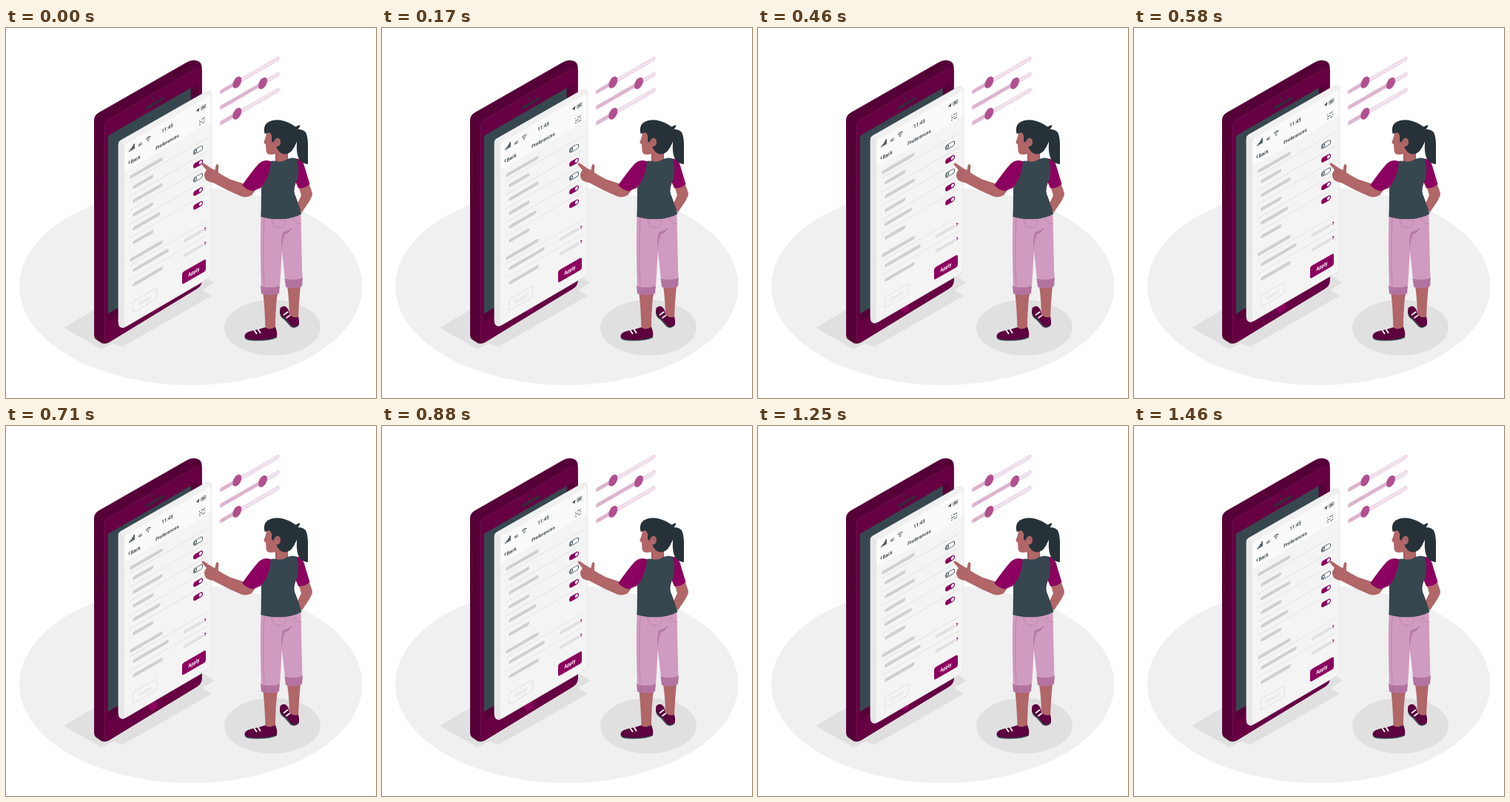
Write an HTML page that moves like this. It is 500 px wide and 500 px high and loops after 1500 ms.

```html
<!DOCTYPE html>
<html lang="en">
<head>
<meta charset="utf-8">
<title>Preferences</title>
<style>
  html, body { margin: 0; width: 100%; height: 100%; overflow: hidden; background: #fff; }
  svg { display: block; width: 100vw; height: 100vh; }
  text { font-family: Roboto, "Liberation Sans", sans-serif; font-weight: 500; text-anchor: middle; fill: #263238; }
  .panel { animation: float 1.5s linear infinite; }
  @keyframes float {
    0%, 100% { transform: translateY(0); }
    50% { transform: translateY(-10px); }
  }
  .accent { fill: #8c005f; }
  .skin { fill: #b16668; }
  .shade { fill: #9a5558; }
  .hair { fill: #263238; }
  .slate { fill: #37474f; }
  .pants { fill: #d09bc0; }
  .cuff { fill: #b273a0; }
  .shoe { fill: #5c003e; }
  .side { fill: #560038; }
  .bars { stroke: #cfcfcf; stroke-width: 4.6; stroke-linecap: round; }
  .soft { stroke: #e0e0e0; stroke-width: 4.6; stroke-linecap: round; }
  .rules { stroke: #dedede; stroke-width: .8; }
  .ink { fill: none; stroke: #263238; stroke-width: .8; }
  .bold { stroke-width: 1.5; }
  .fold { fill: none; stroke: #b57ba5; stroke-width: .8; }
  .crease { fill: none; stroke: #9a5558; stroke-width: .8; }
</style>
</head>
<body>
<svg viewBox="0 0 500 500" xmlns="http://www.w3.org/2000/svg">
  <defs>
    <g id="on">
      <rect class="accent" x="-6.5" y="-3.5" width="13" height="7" rx="3.1" ry="3.5"/>
      <ellipse cx="3.3" rx="2" ry="2.2" fill="#fff"/>
    </g>
    <g id="off">
      <rect x="-6.1" y="-3.1" width="12.2" height="6.200" rx="2.8" ry="3.1" fill="#fff" stroke="#37474f" stroke-width=".8"/>
      <ellipse cx="-3.3" rx="1.5" ry="1.7" fill="#fff" stroke="#37474f"/>
    </g>
    <path id="chevron" d="M-1 -2 1 0 -1 2" fill="none" stroke="#8c005f" stroke-width=".9"/>
    <rect id="track" y="-2.5" width="80" height="5" rx="1.5" fill="#f3e2ee" stroke="#d9b3cc" stroke-width=".5"/>
    <ellipse id="knob" rx="6" ry="7.2" fill="#b0508f"/>
  </defs>

  <!-- floor and shadows -->
  <ellipse cx="249.7" cy="349" rx="231.7" ry="133.5" fill="#f0f0f0"/>
  <ellipse cx="360" cy="405" rx="65" ry="37.6" fill="#e0e0e0"/>
  <path d="M78 405 119 381 264 333 282 344 265 354 278 362 157 431 145 426 129 434Z" fill="#e0e0e0"/>

  <!-- phone -->
  <path class="side" d="M119 125Q119 118 125 114.500L244 46.500Q253 41 261 45.500 264.700 48 264.700 54V341Q264.700 348 258 352L139 425Q132 428 128 425L122 421Q119 419 119 414Z"/>
  <path d="M133 133Q133 127 138 124L258 54.500Q264.700 51 264.700 58V341Q264.700 348.500 258 352.500L140 424Q133 428 133 420Z" fill="#660043"/>
  <path d="M133.200 420V133Q133.200 127 138 124L258 54.500" fill="none" stroke="#7a1f5a" stroke-width=".6"/>
  <path d="M124 164 127 166V202L124 200ZM124 206 127 208V230L124 228ZM226 60 243 50 246 51.500 229 61.500Z" fill="#4a0031"/>
  <path class="side" d="M138 145.500 260 75V326L138 397Z"/>
  <path class="slate" d="M138 145.500 249.700 81V321L138 386Z"/>
  <path d="M190.500 108 212.500 95.500" stroke="#37263a" stroke-width="4" stroke-linecap="round"/>
  <circle cx="198" cy="94.500" r="1.500" fill="#37263a"/>
  <ellipse cx="198.500" cy="377.500" rx="6" ry="7" transform="rotate(25 198.500 377.500)" class="accent"/>

  <!-- floating settings panel -->
  <g class="panel">
    <path d="M151.800 158Q151.800 153.500 155 151.500L268 87Q275 83 277.500 88L278 95V331Q278 335.500 274 338L162 403.500Q158 406 155 404.500L153 403Q151.800 401 151.800 397Z" fill="#f0f0f0"/>
    <path d="M151.800 158Q151.800 154.500 153 153L160.500 158V404.500Q157 406 154.500 404 151.800 402 151.800 397Z" fill="#e8e8e8"/>
    <path d="M160 163Q160 158.500 164 156L273 93Q278 90 278 95V331Q278 335.500 274 338L164 402Q160 404.500 160 399Z" fill="#f4f4f4"/>
    <path d="M160 163Q160 158.500 164 156L273 93Q278 90 278 95V126L160 194Z" fill="#fafafa"/>
    <path d="M268 87Q275 83 277.500 88V331Q277.500 335.500 274 338L162 403.500" fill="none" stroke="#dedede" stroke-width=".7"/>

    <g transform="translate(160) skewY(-30)">
      <path class="ink bold" d="M7 171v-1.500M9 171v-3M11 171v-5M13 171v-7"/>
      <path class="ink" d="M29 167.500q3.300-3.200 6.600 0M30.500 169.200q1.800-1.800 3.600 0"/>
      <circle class="hair" cx="32.300" cy="170.900" r=".8"/>
      <path class="hair" d="M96.500 168.500 101.500 166 100 171.500 99 169Z"/>
      <rect class="ink" x="103.800" y="166.300" width="6" height="4.600" rx=".8" stroke-opacity=".7"/>
      <rect class="hair" x="104.900" y="167.500" width="3.600" height="2.200" opacity=".8"/>
      <path class="ink" d="M101 183.500h1.200M104 183.500h5M101 186.500h4.500M107.500 186.500h1.500M101 189.500h2M105 189.500h4"/>
      <path class="ink" d="M7.200 183.300 5.800 185.300 7.200 187.300"/>
      <g transform="scale(.866 1)">
        <text x="24.500" y="171.500" font-size="5.200">4G</text>
        <text x="67" y="171.300" font-size="7">11:45</text>
        <text x="67" y="189.600" font-size="6.700">Preferences</text>
        <text x="17.300" y="188.300" font-size="6.800">Back</text>
      </g>

      <path class="rules" d="M7 213H112M7 231.800H112M7 250.500H112M7 269.300H112M7 288H112M7 325.500H112M7 344.500H112"/>
      <path class="bars" d="M9.500 206.300H49.500M13.500 222.400H37M13.500 241.100H49.500M13.500 259.800H37M13.500 278.400H46M13.500 297.100H37M9.500 318.500H49.500M13.500 334.500H57.500M13.500 354H49.500"/>
      <path class="soft" d="M82 334.700H104M82 354.300H104"/>
      <use href="#off" x="99.500" y="222.400"/>
      <use href="#on" x="99.500" y="241.100"/>
      <use href="#off" x="99.500" y="259.800"/>
      <use href="#on" x="99.500" y="278.400"/>
      <use href="#on" x="99.500" y="297.100"/>
      <use href="#chevron" x="109" y="334.300"/>
      <use href="#chevron" x="109" y="353.700"/>

      <rect class="accent" x="78" y="375.400" width="32" height="16.400" rx="2.600"/>
      <rect x="11.400" y="376.200" width="32" height="15" rx="2.400" fill="none" stroke="#dedede" stroke-width=".9"/>
      <g transform="scale(.866 1)">
        <text x="108.500" y="386.200" font-size="7" style="fill:#fff;font-weight:700">Apply</text>
        <text x="31.700" y="386.100" font-size="6.800" style="fill:#dcdcdc">Cancel</text>
      </g>
    </g>
  </g>

  <!-- sliders -->
  <g transform="translate(289 87) skewY(-30)">
    <use href="#track"/>
    <use href="#track" y="21.200"/>
    <use href="#track" y="42.200"/>
    <path d="M1 0H23M1 21.200H58M1 42.200H23" stroke="#ddb3cf" stroke-width="4.600"/>
    <use href="#knob" x="23.300"/>
    <use href="#knob" x="58" y="21.200"/>
    <use href="#knob" x="23.300" y="42.200"/>
  </g>

  <!-- legs -->
  <path class="skin" d="M380 349H398Q396 366 395 393L383 393Q383 368 380 349ZM347.500 359H367Q364 376 364 409L350.500 409Q350 382 347.500 359Z"/>
  <path class="slate" d="M370 383Q369 390 376 394L385 404Q391 407 395.500 402V398Z"/>
  <path class="shoe" d="M370 382Q370 375 377 376 382 378 383 387 389 393 395 390 397 397 395.500 401 392 405 386 402.500L378 393Q370 389 370 382Z"/>
  <path d="M375 388 381 383.500M378.500 392 384 388" stroke="#fff" stroke-width="1.700"/>
  <path class="slate" d="M322.500 416Q322 422.500 332 422.500 354 424 366 418.500V414Z"/>
  <path class="shoe" d="M322.500 416.500Q322.500 411.500 331 409.500 342 407.500 350 404.500 356 409 364 404 367 411 366 417 352 422.500 334 421 322.500 420.500 322.500 416.500Z"/>
  <path d="M335.500 408.500 339 413.500M340.500 407 344 412.500" stroke="#fff" stroke-width="1.800"/>
  <path class="pants" d="M368 252H398.500Q399 285 400.500 340L377 340Q375 318 372 296Z"/>
  <path class="pants" d="M344.500 251 394 250Q394 268 376 278 373 284 373 299 371.500 325 370 350L345 351Q343 300 344.500 251Z"/>
  <path d="M387 270Q381 274 374 276 371.500 283 372.500 302 374 284 377 279 383 277 387 270Z" fill="#b57ba5"/>
  <path class="fold" d="M349 258Q346 300 349 348M359 257Q359 270 370 270 377 269 379 259M389 258Q391 265 399 265"/>
  <path class="cuff" d="M344 348Q357 352 370 348L369 359Q357 363 345 359ZM376.500 338Q389 341 401 337L400 349Q389 354 378 350Z"/>
  <path d="M344 348.300Q357 352 370 348.300M376.500 338.300Q389 341 401 337.500" fill="none" stroke="#dbb0ce" stroke-width=".7"/>

  <!-- far arm -->
  <path class="skin" d="M395 213 409 210Q414 221 414 225 413 229 410 234L400 249Q396 246 393 239L399 226Z"/>

  <!-- pointing arm -->
  <path class="skin" d="M323 211 303 204.500Q294 200 287 195.500 286.500 192 287.500 187 287 183.500 284.500 184 283 187 282.500 192L278 190 267 182.500Q264.500 182 264.500 184.500L271 192Q267 196 268.500 202 270 207.500 280 209L300 219.500 318 227.500Q325 230 332 226L338 218Z"/>
  <path class="crease" d="M271 192 276 195M269 198 274 200"/>

  <!-- neck and torso -->
  <path class="shade" d="M364 166H381V181Q372 184 364 181Z"/>
  <path class="skin" d="M366 168 380 164V179Q372 183 365 180Z"/>
  <path class="accent" d="M387 176 396 177Q401 178 403 186L410.500 211Q404 217 395 216.500L388 200Z"/>
  <path class="slate" d="M356 180Q362 179 366 180 373 182 380 177 388 174 393 177 397 190 394 204 388 216 390 224 396 239 399.500 251C386 260 360 260 344.500 255Q345 230 345 216L350 205 354 190Z"/>
  <path class="accent" d="M357.500 180Q348 177 341 184 332 194 319.500 212 322 217 333 220.500L344.500 216Q352 207 354.500 198 358 188 357.500 180Z"/>

  <!-- head -->
  <path class="hair" d="M391 138Q399 135 405 141 408.500 148 408 163L408 184Q401 184 396 177 392 169 393 155L389 147Z"/>
  <path class="skin" d="M353 138Q351 148 348.500 154 348 156 351 157L351.500 166Q352 171 358 171 366 171 374 168L378 155 372 137Z"/>
  <path class="hair" d="M349.500 143Q347 133 353 128 360 123 371 124.500 383 127 391 133.500 394 132 397 131 398 133 395 136 396 150 389 162 384 170 378 170.500 371 171 367 164L362 154Q359 156 359 150 360 144 356 141Z"/>
  <ellipse class="skin" cx="366.500" cy="154.500" rx="4.500" ry="5.800" transform="rotate(12 366.500 154.500)"/>
  <path class="crease" d="M365 152Q368 151 368 156"/>
</svg>
</body>
</html>
```
